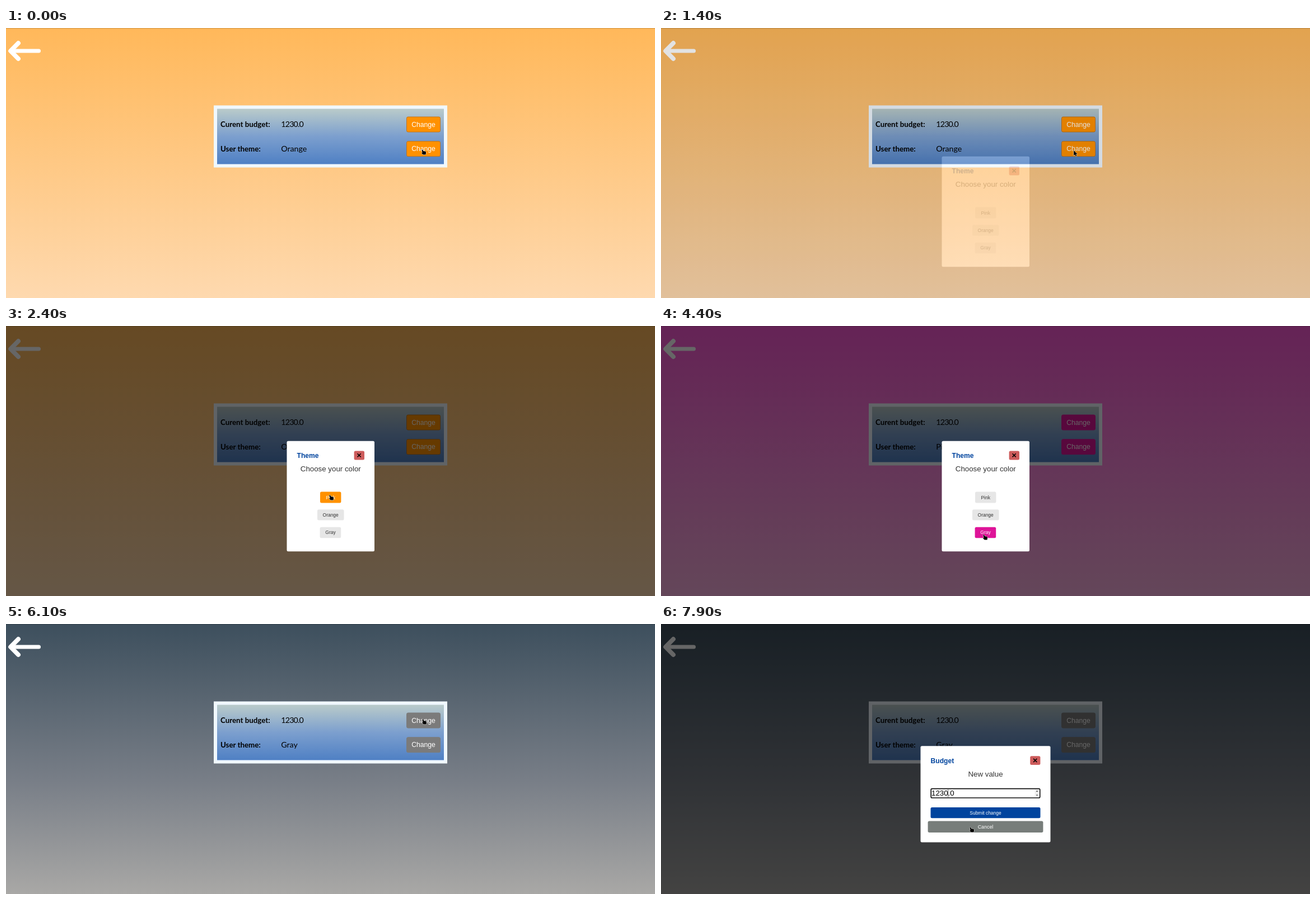
An HTML page that plays this animation: 1159 px wide and 483 px high, repeating every 8 s.

```html
<!DOCTYPE html>
<html lang="en">
<head>
<meta charset="utf-8">
<title>User settings</title>
<style>
  html, body { margin: 0; width: 100%; height: 100%; overflow: hidden; }
  svg { display: block; }
  text { font-family: "Liberation Sans", Arial, sans-serif; }
  .label, .value { font-family: Lato, sans-serif; }
  .label { font-size: 13.3px; font-weight: 700; }
  .value { font-size: 14.2px; }
  .tight { letter-spacing: -.8px; }
  .change { font-size: 12.2px; fill: #fff; text-anchor: middle; }
  .title { font-size: 12.08px; font-weight: 700; fill: #00449e; }
  .body { font-size: 13.3px; fill: #333; text-anchor: middle; }
  .small { font-size: 8.45px; fill: #333; text-anchor: middle; }
  .field { font-size: 13.3px; }
  .cross { stroke: #000; stroke-width: 1.5; }
  .cursor { fill: #000; stroke: #fff; stroke-width: 1; stroke-linejoin: round; paint-order: stroke; }
</style>
</head>
<body>
<svg width="1159" height="483" viewBox="0 0 1159 483">
  <defs>
    <linearGradient id="Orange" x2="0" y2="1"><stop stop-color="#ffb85a"/><stop offset="1" stop-color="#fed9af"/></linearGradient>
    <linearGradient id="Pink" x2="0" y2="1"><stop stop-color="#fd58d7"/><stop offset="1" stop-color="#fcb1e1"/></linearGradient>
    <linearGradient id="Gray" x2="0" y2="1"><stop stop-color="#3d4f5d"/><stop offset=".58" stop-color="#787e87"/><stop offset="1" stop-color="#a9a8a6"/></linearGradient>
    <linearGradient id="panel" x2="0" y2="1"><stop stop-color="#bacbca"/><stop offset=".5" stop-color="#7c9fce"/><stop offset="1" stop-color="#4f80c4"/></linearGradient>
  </defs>

  <g id="page">
    <rect id="backdrop" width="1159" height="483"/>
    <rect width="1159" height="1" opacity=".14"/>
    <rect y="1" width="1159" height="1" opacity=".04"/>
    <g fill="none" stroke="#fff" stroke-linecap="round" stroke-linejoin="round">
      <path d="M22 27L8.2 41L22 55" stroke-width="8"/>
      <path d="M9 41H58.5" stroke-width="7"/>
    </g>
    <rect x="371" y="138.5" width="417" height="111" fill="#f0f8ff"/>
    <rect x="377" y="144.5" width="405" height="99" fill="url(#panel)"/>
    <text class="label" x="383" y="177.3">Curent budget:</text>
    <text class="value tight" x="491.3" y="177.3">1230.0</text>
    <text class="label" x="383" y="221">User theme:</text>
    <text class="value" id="themeName" x="491.3" y="221"></text>
    <rect class="hit pageButton" x="715.5" y="159" width="60" height="27" rx="2.5"/>
    <rect class="hit pageButton" x="715.5" y="202.7" width="60" height="27" rx="2.5"/>
    <text class="change" x="745.5" y="176.6">Change</text>
    <text class="change" x="745.5" y="220.2">Change</text>
  </g>

  <g id="themeModal">
    <rect width="1159" height="483" opacity=".6"/>
    <g id="themeBox">
      <rect x="501.5" y="205.7" width="156.5" height="197.5" rx="2.5" fill="#fff"/>
      <text class="title" x="519.6" y="235.7">Theme</text>
      <rect class="hit" x="621.6" y="223.6" width="18.4" height="15.8" rx="2.5" fill="#cd5c5c"/>
      <path class="cross" d="M627.5 228.2l6.2 6.2m0-6.2l-6.2 6.2"/>
      <text class="body" x="579.8" y="259.8">Choose your color</text>
      <rect class="hit choice" x="561" y="296.4" width="37.4" height="20" rx="2.5"/>
      <text class="small" x="579.7" y="309.6">Pink</text>
      <rect class="hit choice" x="556" y="328.2" width="47.5" height="19.4" rx="2.5"/>
      <text class="small" x="579.7" y="341">Orange</text>
      <rect class="hit choice" x="560.6" y="359.8" width="37.6" height="19.4" rx="2.5"/>
      <text class="small" x="579.5" y="372.4">Gray</text>
    </g>
  </g>

  <g id="budgetModal">
    <rect width="1159" height="483" opacity=".6"/>
    <rect x="463.5" y="218.3" width="232" height="172.2" rx="2.5" fill="#fff"/>
    <text class="title" x="481.6" y="248.5">Budget</text>
    <rect class="hit" x="659.2" y="236.3" width="18.2" height="15.8" rx="2.5" fill="#cd5c5c"/>
    <path class="cross" d="M665.1 240.9l6.2 6.2m0-6.2l-6.2 6.2"/>
    <text class="body" x="579.5" y="272.8">New value</text>
    <rect x="482.2" y="294.6" width="194.5" height="16.4" rx="2" fill="#fff" stroke="#101010" stroke-width="1.7"/>
    <text class="field" x="483" y="307.4">1230.0</text>
    <path id="caret" d="M512.7 296V310" stroke="#333" stroke-width=".7"/>
    <rect x="667.5" y="296" width="8" height="13.5" fill="#efefef"/>
    <path d="M669.7 300l1.8-2.2l1.8 2.2zm0 5.4l1.8 2.2l1.8-2.2z" fill="#444"/>
    <g id="submit">
      <rect class="hit" x="481.5" y="327.9" width="196" height="19.4" rx="2.5" fill="#00449e"/>
      <text class="small" style="fill:#fff" x="579.5" y="340.5">Submit change</text>
    </g>
    <g id="cancel">
      <rect class="hit" x="481.5" y="353" width="196" height="19.4" rx="2.5"/>
      <text class="small" x="579.5" y="365.8">Cancel</text>
    </g>
  </g>

  <path id="arrow" class="cursor" d="M0 0V9.3L2.2 7.3L3.8 10.8L5.4 10.1L3.9 6.7H6.8Z"/>
  <path id="hand" class="cursor" d="M.3 .8Q1.2 -.3 2 .8L3.3 3.2L6.5 3.6Q8 4 8 5.6L7.6 9.6H2.7L.2 7Q-.3 5.8 1.6 5.9Z"/>
</svg>
<script>
const LOOP = 8000, STEP = 100;
const $ = id => document.getElementById(id);
const all = (selector, root = document) => [...root.querySelectorAll(selector)];
const buttonColor = { Orange: '#ff9100', Pink: '#de1498', Gray: '#7b7b7b' };

// time, x, y of the pointer
const path = [
  [0, 742, 217], [199, 742, 217], [200, 741, 220], [300, 739, 222], [500, 736, 221],
  [699, 736, 221], [700, 736, 220], [800, 737, 219], [1500, 737, 219], [1800, 655, 262],
  [2100, 579, 299], [2299, 579, 299], [2400, 577, 302], [4399, 577, 302], [4400, 575, 373],
  [4600, 577, 371], [5200, 630, 231], [5300, 630, 231], [5600, 707, 169],
  [6099, 707, 169], [6100, 743, 170], [6999, 743, 170], [7000, 531, 331],
  [7499, 531, 331], [7500, 533, 333], [7899, 533, 333], [7900, 551, 363], [8000, 551, 363]
];

function pointerAt(t) {
  const i = path.findIndex(p => p[0] > t);
  const [t0, x0, y0] = path[i - 1], [t1, x1, y1] = path[i];
  const k = (t - t0) / (t1 - t0);
  return [x0 + (x1 - x0) * k, y0 + (y1 - y0) * k];
}

// cubic-bezier(0, 0, .2, 1)
function ease(x) {
  if (x <= 0) return 0;
  if (x >= 1) return 1;
  let lo = 0, hi = 1;
  for (let i = 0; i < 20; i++) {
    const u = (lo + hi) / 2;
    if (.6 * u * u + .4 * u ** 3 < x) lo = u; else hi = u;
  }
  return 3 * lo * lo - 2 * lo ** 3;
}

function contains(rect, x, y) {
  const [left, top, w, h] = ['x', 'y', 'width', 'height'].map(a => +rect.getAttribute(a));
  return x >= left && x <= left + w && y >= top && y <= top + h;
}

const show = (el, on) => el.setAttribute('display', on ? 'inline' : 'none');

function paintButton(rect, hovered, hoverFill) {
  rect.setAttribute('fill', hovered ? hoverFill : '#e6e6e6');
  rect.nextElementSibling.style.fill = hovered ? '#fff' : '#333';
}

function grow(group, on, cy) {
  group.setAttribute('transform', on ? `translate(579.5 ${cy}) scale(1.05) translate(-579.5 ${-cy})` : '');
}

function render(t) {
  const theme = t < 4400 ? 'Orange' : t < 4600 ? 'Pink' : 'Gray';
  const color = buttonColor[theme];
  $('backdrop').setAttribute('fill', `url(#${theme})`);
  $('themeName').textContent = theme;
  for (const b of all('.pageButton')) {
    b.setAttribute('fill', color);
    b.setAttribute('stroke', theme === 'Orange' ? '#bd741c' : color);
  }

  const opened = ease((t - 1386) / 254), closed = ease((t - 5286) / 254);
  const themeOpen = opened > 0 && closed < 1, budgetOpen = t >= 7000;
  show($('themeModal'), themeOpen);
  $('themeModal').setAttribute('opacity', opened * (1 - closed));
  $('themeBox').setAttribute('transform', `translate(0 ${29.6 * (1 - opened) - 19.7 * closed})`);
  show($('budgetModal'), budgetOpen);
  show($('caret'), t >= 7500);

  const [x, y] = pointerAt(t);
  const layer = $(budgetOpen ? 'budgetModal' : themeOpen ? 'themeModal' : 'page');
  const hovered = all('.hit', layer).find(r => contains(r, x + 1, y + 1));
  for (const b of all('.choice')) paintButton(b, b === hovered, color);
  const cancel = $('cancel').firstElementChild;
  paintButton(cancel, cancel === hovered, '#777d7a');
  grow($('cancel'), cancel === hovered, 362.7);
  grow($('submit'), $('submit').firstElementChild === hovered, 337.6);

  show($('hand'), hovered);
  show($('arrow'), !hovered);
  $(hovered ? 'hand' : 'arrow').setAttribute('transform', `translate(${x} ${y})`);
}

const start = performance.now();
function tick() {
  const t = (performance.now() - start) % LOOP;
  render(Math.floor(t / STEP) * STEP);
  requestAnimationFrame(tick);
}
tick();
</script>
</body>
</html>
```
